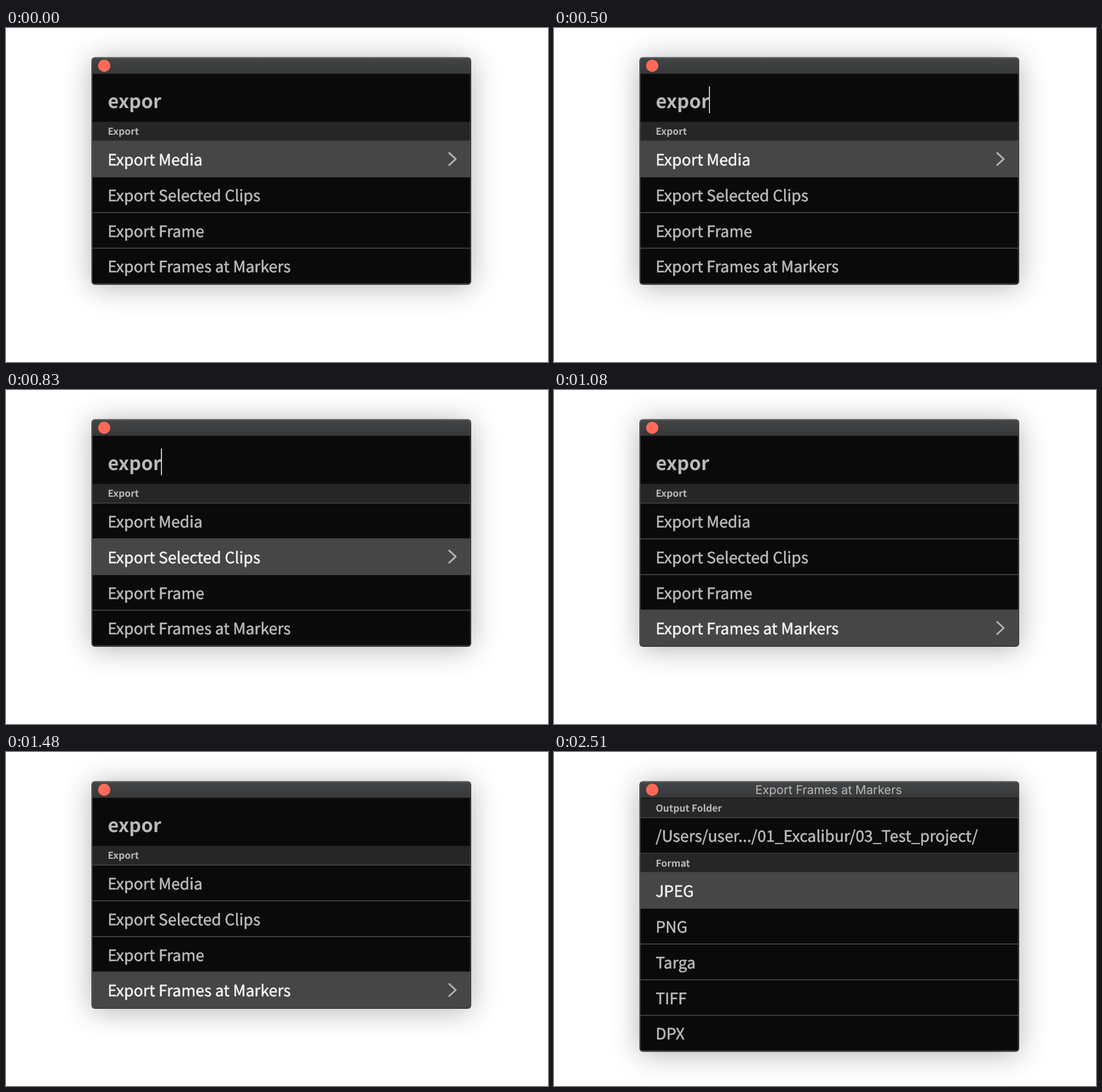
Recreate the animation shown at these times as an HTML page with a canvas. Size 952x588 px, loop 3.01 s.

```html
<!DOCTYPE html>
<html lang="en">
<head>
<meta charset="utf-8">
<title>Export palette</title>
<style>
  html, body { margin: 0; height: 100%; overflow: hidden; background: #fff; }
  canvas { display: block; }
</style>
</head>
<body>
<canvas id="stage" width="952" height="588"></canvas>
<script>
const ctx = document.getElementById('stage').getContext('2d', { alpha: false });
const LOOP = 3010;
const LEFT = 150.2, TOP = 51.4, WIDTH = 666.8, ROW = 62.8, HEADER = 33.8;
const TEXT_X = 178.4;
const SANS = '"Noto Sans CJK JP", "Noto Sans CJK SC", "Noto Sans CJK", "Open Sans", sans-serif';
const ROW_FONT = `400 27.4px ${SANS}`;
const LABEL_FONT = `700 16.8px ${SANS}`;
const SEARCH_FONT = `700 33.2px ${SANS}`;
const TITLE_FONT = '400 21.2px Inter, Roboto, sans-serif';
const GREY = '#b9b9b9', LINE = '#434343';

const commands = ['Export Media', 'Export Selected Clips', 'Export Frame', 'Export Frames at Markers'];
const formats = ['JPEG', 'PNG', 'Targa', 'TIFF', 'DPX'];

function rect(x, y, w, h, color) {
  ctx.fillStyle = color;
  ctx.fillRect(x, y, w, h);
}

function text(string, x, y, font, color = GREY, weight = 0) {
  ctx.font = font;
  ctx.fillStyle = ctx.strokeStyle = color;
  ctx.fillText(string, x, y);
  if (weight) {
    ctx.lineWidth = weight;
    ctx.strokeText(string, x, y);
  }
}

function outline(inset, height) {
  ctx.beginPath();
  ctx.roundRect(LEFT + inset, TOP + inset, WIDTH - 2 * inset, height - 2 * inset, 6 - inset);
}

function header(label, y) {
  rect(LEFT, y, WIDTH, HEADER, '#262626');
  text(label, TEXT_X + 0.3, y + 23, LABEL_FONT);
}

function row(label, y, selected) {
  if (selected) rect(LEFT, y, WIDTH, ROW, '#464646');
  rect(LEFT, y, WIDTH, 1.6, LINE);
  rect(LEFT, y + ROW, WIDTH, 1.6, LINE);
  text(label, TEXT_X, y + 43.5, ROW_FONT, selected ? '#f2f2f2' : GREY, 0.6);
}

function chevron(y) {
  ctx.beginPath();
  ctx.moveTo(777.5, y - 11.5);
  ctx.lineTo(790, y);
  ctx.lineTo(777.5, y + 11.5);
  ctx.strokeStyle = '#b4b4b4';
  ctx.lineWidth = 3;
  ctx.stroke();
}

function panel(height, title, drawContent) {
  rect(0, 0, 952, 588, '#fff');
  ctx.save();
  ctx.shadowColor = 'rgba(0, 0, 0, .3)';
  ctx.shadowBlur = 50;
  ctx.shadowOffsetY = 4;
  outline(0, height);
  ctx.fillStyle = '#0a0a0a';
  ctx.fill();
  ctx.restore();

  ctx.save();
  outline(0.8, height);
  ctx.clip();
  const bar = ctx.createLinearGradient(0, TOP, 0, TOP + 29);
  bar.addColorStop(0, '#434547');
  bar.addColorStop(1, '#363839');
  rect(LEFT, TOP, WIDTH, 29.2, bar);
  ctx.beginPath();
  ctx.arc(172.5, 66.5, 10.7, 0, 2 * Math.PI);
  ctx.fillStyle = '#fe6a57';
  ctx.fill();
  ctx.textAlign = 'center';
  text(title, 482.4, 74.2, TITLE_FONT, '#b8b9ba');
  ctx.textAlign = 'left';
  drawContent();

  // Light rim, brightest along the top, inside a dark edge
  const rim = ctx.createLinearGradient(0, TOP, 0, TOP + 10);
  rim.addColorStop(0, '#838586');
  rim.addColorStop(1, '#5c5d5e');
  outline(1.3, height);
  ctx.strokeStyle = rim;
  ctx.lineWidth = 1;
  ctx.stroke();
  ctx.restore();
}

function drawSearch(selected, caret) {
  const top = 198.4, y = top + selected * ROW;
  panel(400.6, '', () => {
    text('expor', TEXT_X + 0.3, 140.6, SEARCH_FONT);
    if (caret) rect(272, 103, 2, 47, '#c4c4c4');
    header('Export', 165.2);
    commands.forEach((name, i) => row(name, top + i * ROW, false));
    row(commands[selected], y, true);
    chevron(y + 32.2);
  });
}

function drawFormats() {
  const top = 211.6;
  panel(476.4, 'Export Frames at Markers', () => {
    header('Output Folder', 81.7);
    row('/Users/user.../01_Excalibur/03_Test_project/', 114.8, false);
    header('Format', 179.2);
    formats.forEach((name, i) => row(name, top + i * ROW, false));
    row(formats[0], top, true);
  });
}

function draw(t) {
  if (t >= 1750) drawFormats();
  else drawSearch([830, 1000, 1080].filter(start => t >= start).length, t >= 500 && t < 1000);
}

ctx.textRendering = 'geometricPrecision';
ctx.lineJoin = 'round';

function tick() {
  draw(performance.now() % LOOP);
  requestAnimationFrame(tick);
}
tick();
</script>
</body>
</html>
```
